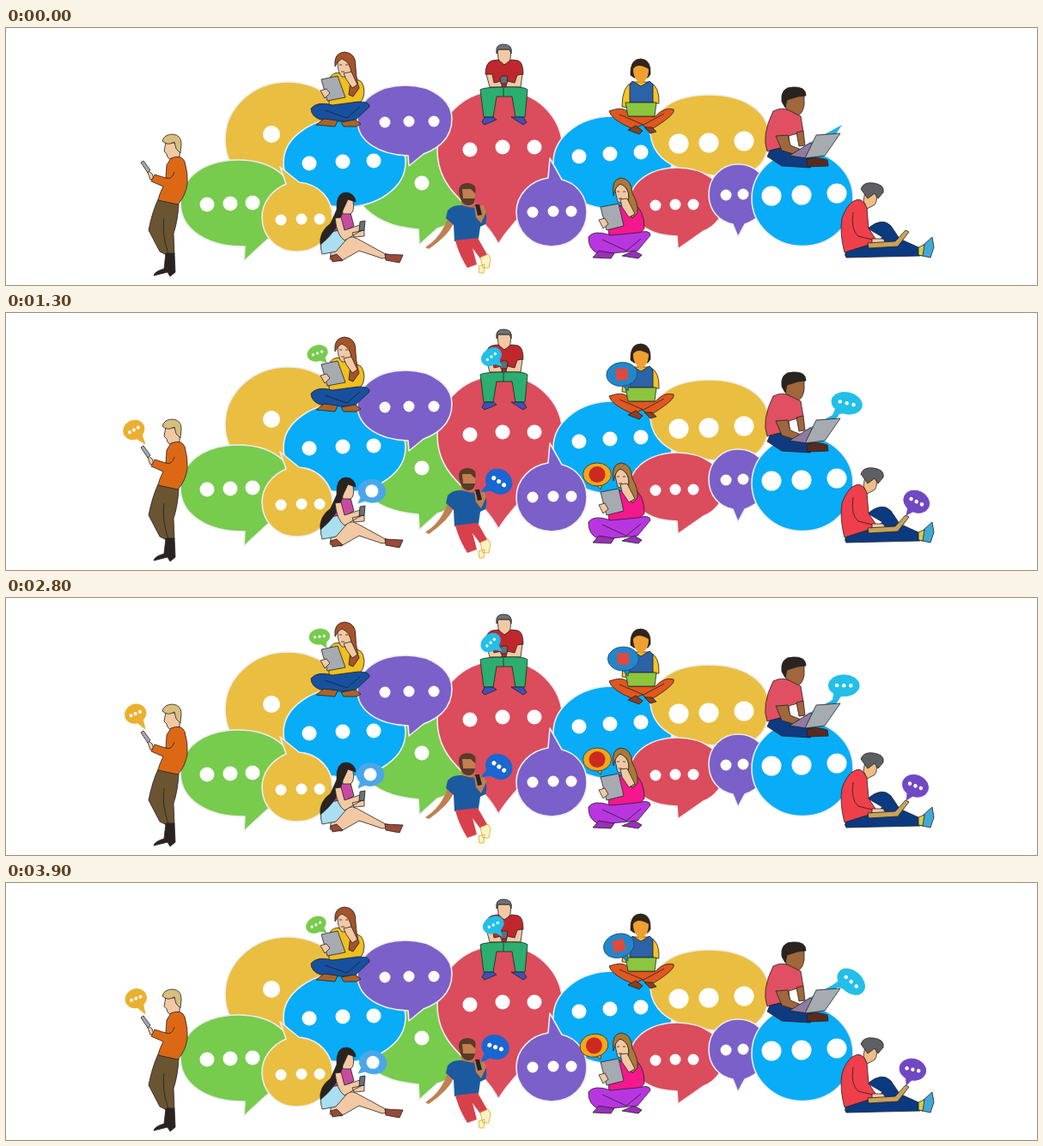
Write an HTML page that moves like this. It is 1200 by 300 pixels and loops after 4000 ms.

```html
<!DOCTYPE html>
<html lang="en">
<head>
<meta charset="utf-8">
<title>People chatting</title>
<style>
html, body { margin: 0; width: 100%; height: 100%; overflow: hidden; background: #fff; }
svg { display: block; width: 1200px; height: 300px; }
#speech { stroke: #eee; stroke-width: 1.6; stroke-linejoin: round; }
#dots { stroke: #fff; stroke-linecap: round; }
#people { stroke: #222; stroke-width: .8; stroke-linejoin: round; }
.yellow { fill: #eabe41; } .green { fill: #77cb4d; } .blue { fill: #08acf7; }
.purple { fill: #7a60c8; } .red { fill: #db4c5c; }
.skin { fill: #f2c9a4; } .tan { fill: #c08050; } .brown { fill: #a0663c; }
.gray { fill: #a6abb1; } .dark { fill: #2a2320; } .line { fill: none; }
</style>
</head>
<body>
<svg viewBox="0 0 1200 300">
<g id="speech">
  <ellipse class="yellow" cx="328" cy="130" rx="73" ry="67"/>
  <path class="green" d="M413 205Q408 158 450 144Q480 130 506 138Q548 150 550 185Q548 220 502 234L481 253L480 235Q435 232 413 205Z"/>
  <path class="red" d="M502 143C503 98 538 73 576 73C616 73 648 102 648 143C648 186 605 202 573 252C552 210 502 196 502 143Z"/>
  <ellipse class="blue" cx="394" cy="157" rx="71" ry="52"/>
  <path class="purple" d="M409 108C409 84 433 67 465 67C496 67 519 84 519 106C519 129 502 141 486 147L469 161L468 149C434 148 409 132 409 108Z"/>
  <ellipse class="blue" cx="706" cy="157" rx="69" ry="54"/>
  <path class="yellow" d="M750 124C752 94 780 78 818 78C858 78 888 96 888 126C888 150 880 167 850 174C800 172 754 164 750 124Z"/>
  <path class="red" d="M726 203C726 180 750 163 781 163C812 163 836 180 836 202C836 219 826 231 812 237L782 258L781 243C750 243 726 227 726 203Z"/>
  <path class="purple" d="M818 194C818 174 833 159 852 159C872 159 887 174 887 194C887 213 874 224 860 229L852 244L846 229C830 226 818 213 818 194Z"/>
  <ellipse class="blue" cx="927" cy="199" rx="59" ry="55.5"/>
  <path class="purple" d="M633 152L647 177C664 181 676 196 676 215C676 238 658 255 635 255C612 255 594 238 594 215C594 195 610 178 631 175Z"/>
  <path class="green" d="M203 204C204 174 230 154 270 154C310 154 336 175 336 204C336 225 322 240 304 247L277 272L278 255C234 256 203 235 203 204Z"/>
  <path class="yellow" d="M319 162L341 180C365 182 380 200 380 221C380 244 362 261 338 261C315 261 298 243 298 221C298 203 310 189 326 182Z"/>
</g>
<g id="dots">
  <path stroke-width="20" d="M309 124h.01"/>
  <path stroke-width="17" d="M234 206h0M261 205h0M287 204h0M353 158h0M392 156h0M428 155h0M484 181h0M540 142h0M578 139h0M615 139h0M667 150h0M703 147h0M739 145h0"/>
  <path stroke-width="13" d="M441 110h0M469 109h0M498 109h0M320 224h0M344 223h0M365 223h0M613 215h0M637 214h0M658 214h0M756 207h0M779 206h0M800 206h0M838 195h0M858 194h0"/>
  <path stroke-width="23" d="M783 135h0M818 134h0M859 132h0M891 196h0M926 195h0M967 193h0"/>
</g>
<path fill="#1fb4e8" d="M973 113L962 130L930 137Z"/>
<g id="people">
  <g>
    <path class="skin" d="M186 133L184 144L187 147Q188 154 194 153L202 150L203 135Z"/>
    <path fill="#d9bf7d" d="M182 132Q184 124 194 124Q204 125 204 135L203 146L198 141L196 133Q188 138 182 132Z"/>
    <path fill="#6a5432" d="M177 200L201 205Q200 225 195 240L196 264L189 266L179 261L166 236Q170 215 177 200Z"/>
    <path class="line" d="M184 222Q181 240 189 264"/>
    <path class="dark" d="M186 263L196 263L197 285L191 290L188 285L172 289Q173 284 184 281Z"/>
    <path class="skin" d="M164 166L170 170L172 176L168 177Z"/>
    <path fill="#dc6816" d="M192 152Q204 147 208 156Q212 170 211 182Q209 196 200 206L177 201Q178 195 183 185L169 179L173 171L186 175L187 160Z"/>
    <path class="line" d="M186 175Q193 178 196 168"/>
    <path class="gray" d="M157 157L160 155L168 166L165 169Z"/>
  </g>
  <g>
    <path fill="#efc01f" d="M376 60Q380 50 390 53L404 60Q416 58 417 74Q416 90 406 87L376 95Z"/>
    <path class="skin" d="M386 41Q387 33 395 34Q404 37 403 50Q399 58 391 57Q386 52 386 41Z"/>
    <path fill="#a5532a" d="M383 45Q381 29 394 28Q408 29 407 46Q408 62 411 70L404 80L399 78L402 53Q401 40 391 36Q386 38 383 45Z"/>
    <path class="skin" d="M393 53L402 51L409 66L403 70L396 60Z"/>
    <path fill="#17509f" d="M355 94Q362 85 380 90L410 86Q424 86 423 92L406 108L390 109L366 107Q355 103 355 94Z"/>
    <path class="line" d="M371 96L397 105L412 92M388 43h3M395 43h3M390 51h4"/>
    <path fill="#a8652a" d="M361 113L370 106L386 108L383 115ZM390 110L406 107L413 112L408 115L393 115Z"/>
    <path class="gray" d="M367 60L386 56L395 81L374 85Z"/>
    <path class="skin" d="M366 73L373 71L377 76L371 82Z"/>
  </g>
  <g>
    <path class="skin" d="M572 25L588 25L587 36L584 43L576 43L573 36Z"/>
    <path fill="#6e7276" d="M571 30Q569 19 579 19Q590 19 588 30L586 25L573 25Z"/>
    <path fill="#c0272d" d="M566 38L573 37L580 43L588 37L596 38Q602 40 602 54L596 56L595 69L565 69L566 55L558 54Q558 40 566 38Z"/>
    <path class="skin" d="M559 54L566 54L568 64L577 62L577 69L563 69ZM601 54L595 55L592 64L583 62L582 69L599 69Z"/>
    <path fill="#2cae70" d="M552 72Q556 69 580 69Q604 68 607 72L604 104L593 104L589 80L571 80L567 104L556 104Z"/>
    <path class="line" d="M579 70V80"/>
    <path fill="#3e50b8" d="M557 104L567 104L571 107L557 113L554 110ZM588 104L602 104L606 110L602 113Z"/>
    <path fill="#666d72" d="M575 58Q579 54 584 57L583 65L576 65Z"/>
  </g>
  <g>
    <path fill="#f5c524" d="M730 63Q717 67 717 92L727 93L730 82L751 82L754 88L760 88Q761 68 749 63Z"/>
    <path fill="#2c62a8" d="M729 62L739 68L749 62L753 66V87H726V66Z"/>
    <path fill="#32241a" d="M727 55Q726 36 739 36Q751 37 750 54L747 58H731Z"/>
    <path fill="#f0a030" stroke="none" d="M730 48Q735 40 748 48Q748 57 744 61L739 66L734 61Q730 56 730 48Z"/>
    <path fill="#e0571f" d="M702 97Q718 91 724 98L725 103H756Q766 92 777 95Q780 101 750 119L740 113L730 118Q704 107 702 97Z"/>
    <path class="line" d="M714 101L742 113L766 100"/>
    <path fill="#8a4020" d="M724 119L733 114L741 120L737 124ZM743 116L752 116L757 121L750 123Z"/>
    <path fill="#8cc63e" d="M721 87H757L755 103H724Z"/>
  </g>
  <g>
    <path class="brown" d="M906 81L929 78L929 90Q927 102 919 103L909 101Z"/>
    <path class="dark" d="M903 86Q901 69 916 69Q931 68 931 79L922 80L909 84L907 93Z"/>
    <path fill="#e04f62" d="M893 97Q903 92 911 96L925 103L928 121L911 126L912 138L886 144Q879 125 893 97Z"/>
    <path fill="#103a80" d="M889 143L905 139Q925 147 942 153L936 163L903 161L886 150Z"/>
    <path fill="#5a2a20" d="M932 154Q942 149 956 154L957 161L933 162Z"/>
    <path class="brown" d="M896 126L910 125L913 137L928 143L923 149L903 143ZM920 122L928 120L930 137L923 138Z"/>
    <path fill="#8f7aa0" d="M912 149L936 134L944 139L932 152Z"/>
    <path class="gray" d="M943 125L971 123L953 149L930 152Z"/>
  </g>
  <g>
    <path class="skin" d="M380 250Q400 240 409 246L440 263L452 267L438 269L411 260L390 272L377 270Z"/>
    <path fill="#c84aa0" d="M384 217L401 216L405 231L389 240L376 232Z"/>
    <path fill="#a9dff0" d="M370 240L388 236L397 246L384 261L368 264Q364 252 370 240Z"/>
    <path class="skin" d="M390 200Q397 194 404 202Q406 214 401 217L392 217Z"/>
    <path class="dark" d="M385 212Q384 192 396 192Q406 193 407 203L398 200L392 213Q388 235 366 253Q364 238 378 228Z"/>
    <path class="skin" d="M383 222L390 221L394 236L412 230L416 235L394 248Q385 242 383 222ZM403 239L417 236L417 243L405 244Z"/>
    <path fill="#6a7075" d="M412 226L418 225L417 236L411 237Z"/>
    <path fill="#9a4a38" d="M441 264L462 265L458 274L442 271ZM378 266L385 264L392 271L380 273Z"/>
  </g>
  <g stroke="none">
    <path class="tan" d="M514 222L521 228Q515 242 492 258L488 256Q506 245 514 222ZM529 188H546V205L540 211L530 207Z"/>
    <path fill="#5a3a28" d="M527 190Q527 181 538 181Q549 182 546 193L541 188H531L532 199H546Q545 208 538 207Q529 207 527 190Z"/>
    <path fill="#1c5aa0" d="M514 213Q520 206 530 207L544 210L557 210Q561 220 558 229L552 232L550 246L522 249L521 230L512 222Z"/>
    <path fill="#d8414c" d="M523 248L549 245L561 266L552 269L543 257L548 276L537 280Q527 264 523 248Z"/>
    <path class="tan" d="M545 208L556 207L559 215L553 228L547 221Z"/>
    <path class="dark" d="M546 206L551 206L554 218L549 219Z"/>
    <path fill="#fff3c4" stroke="#d8a72c" d="M552 268L561 264L564 269L562 280L555 280ZM550 278L557 276L556 286L551 286Z"/>
  </g>
  <g>
    <path fill="#f4188c" d="M700 214Q706 204 718 208L731 206Q743 212 743 234L734 245L702 246Z"/>
    <path class="skin" d="M709 190Q710 182 717 182Q726 188 725 200Q719 206 712 203Z"/>
    <path fill="#a87a3a" d="M707 196Q704 176 716 175Q728 176 729 193Q736 205 735 216L729 222L722 210L725 198Q725 186 715 182Q709 185 707 196Z"/>
    <path class="skin" d="M715 200L723 199L732 217L725 221L717 209Z"/>
    <path fill="#b836e0" d="M678 244Q684 235 704 242L735 239Q750 235 750 242L735 260L715 262L690 264Q677 258 678 244Z"/>
    <path class="line" d="M694 247L722 260L739 246M711 191h3M718 191h3M713 199h4"/>
    <path fill="#9a2fb8" d="M683 268L690 260L708 263L704 269ZM717 266L731 260L740 265L736 269Z"/>
    <path class="gray" d="M692 209L713 205L719 231L699 236Z"/>
    <path class="skin" d="M690 224L697 222L701 229L695 234Z"/>
  </g>
  <g>
    <path fill="#f0bd86" d="M1000 190L1013 193Q1015 206 1008 208L1002 211L998 202Z"/>
    <path fill="#5d5f63" d="M995 188Q998 179 1010 181Q1023 183 1021 192L1015 199L1011 193L1003 199Z"/>
    <path fill="#0c3a80" d="M1003 234Q1020 220 1030 231L1040 246L1062 256L1064 266L978 268Q972 260 990 257L1014 251L1020 244Z"/>
    <path fill="#ef3f4a" d="M985 203Q996 195 1002 210L1004 234L1012 246L1007 252L976 262Q970 240 973 222Q978 208 985 203Z"/>
    <path class="line" d="M986 215Q983 236 992 243L1008 247"/>
    <path class="skin" d="M1008 246L1021 246L1024 251L1008 252Z"/>
    <path fill="#c9a25a" d="M1003 251L1035 249L1047 236L1051 238L1038 255L1004 257Z"/>
    <path fill="#42a8d6" d="M1068 253L1078 244L1080 256L1076 268L1062 265Z"/>
    <path fill="#d8cf45" d="M1062 256L1069 253L1067 266L1062 265Z"/>
  </g>
</g>
<g id="messages"></g>
</svg>
<script>
(() => {
  const loopMs = 4000, stepMs = 100, swingMs = 700, growMs = 500;

  // tip: pivot, at: centre from the tip, swing: mean angle, amplitude and peak time, lean: extra tilt on arrival
  const bubbles = [
    { color: '#eab030', tip: [162, 153], at: [-3.4, -20.9], size: [12.5, 11], swing: [-20, 10, 210], start: 450, lean: -20 },
    { color: '#77cb4d', tip: [373, 58], at: [-6.3, -13.9], size: [12, 9], swing: [-16, 13.5, 100], start: 500, lean: -20 },
    { color: '#22bfe8', tip: [577, 62], at: [-3, -16], size: [12.5, 9.5], swing: [-34, 8, 380], start: 200, lean: 8 },
    { color: '#2187cb', tip: [724, 91], at: [-5.5, -20], size: [18, 14], swing: [-8, 8, 30], start: 700, lean: 0,
      mark: '<path fill="#dc4a40" d="M-7-7H7V7H-7Z"/>', edge: '#174c78' },
    { color: '#22bfe8', tip: [962, 120], at: [13, -18], size: [18, 12.5], swing: [21, 21, 380], start: 250, lean: 10 },
    { color: '#7048c4', tip: [1048, 236], at: [3.3, -19.4], size: [15.5, 12.5], swing: [15, 12, 600], start: 500, lean: 28 },
    { color: '#1a66d2', tip: [553, 209], at: [10, -21.9], size: [16, 14], swing: [26, 10, 660], start: 300, lean: 8 },
    { color: '#4aa6ea', tip: [410, 222], at: [14, -16], size: [16, 13.5], swing: [5, 8, 450], start: 350, lean: 0,
      mark: '<circle r="7.5" fill="#fff"/>' },
    { color: '#f0a81c', tip: [692, 206], at: [-4, -17.5], size: [16.5, 13.5], swing: [-7, 8, 650], start: 400, lean: 12,
      mark: '<circle r="9.5" fill="#cc2a20"/>', edge: '#333' },
  ];

  const clamp = v => Math.max(0, Math.min(1, v));

  const threeDots = ([rx, ry]) => [-.45, 0, .45]
    .map(k => `<circle cx="${k * rx}" r="${ry * .18}" fill="#fff"/>`).join('');

  function pose({ tip, swing: [mean, amp, peak], start, lean }, t) {
    const angle = mean + amp * Math.cos(2 * Math.PI * (t - peak) / swingMs) + lean * clamp((1200 - t) / 300);
    return `translate(${tip}) rotate(${angle.toFixed(2)}) scale(${clamp((t - start) / growMs)})`;
  }

  function shape({ color, at: [x, y], size, mark, edge }) {
    const [rx, ry] = size, k = rx * .35 / Math.hypot(x, y);
    const left = [x * .6 - y * k, y * .6 + x * k], right = [x * .6 + y * k, y * .6 - x * k];
    return `<g fill="${color}" stroke="${edge || color}" stroke-width=".8">
      <path d="M0 0L${left}L${right}Z"/>
      <ellipse cx="${x}" cy="${y}" rx="${rx}" ry="${ry}"/>
      <g transform="translate(${x},${y})" stroke="none">${mark || threeDots(size)}</g></g>`;
  }

  const layer = document.getElementById('messages');

  function draw() {
    const t = Math.floor(performance.now() % loopMs / stepMs) * stepMs;
    layer.innerHTML = bubbles.filter(b => t > b.start)
      .map(b => `<g transform="${pose(b, t)}">${shape(b)}</g>`).join('');
    requestAnimationFrame(draw);
  }
  draw();
})();
</script>
</body>
</html>
```
